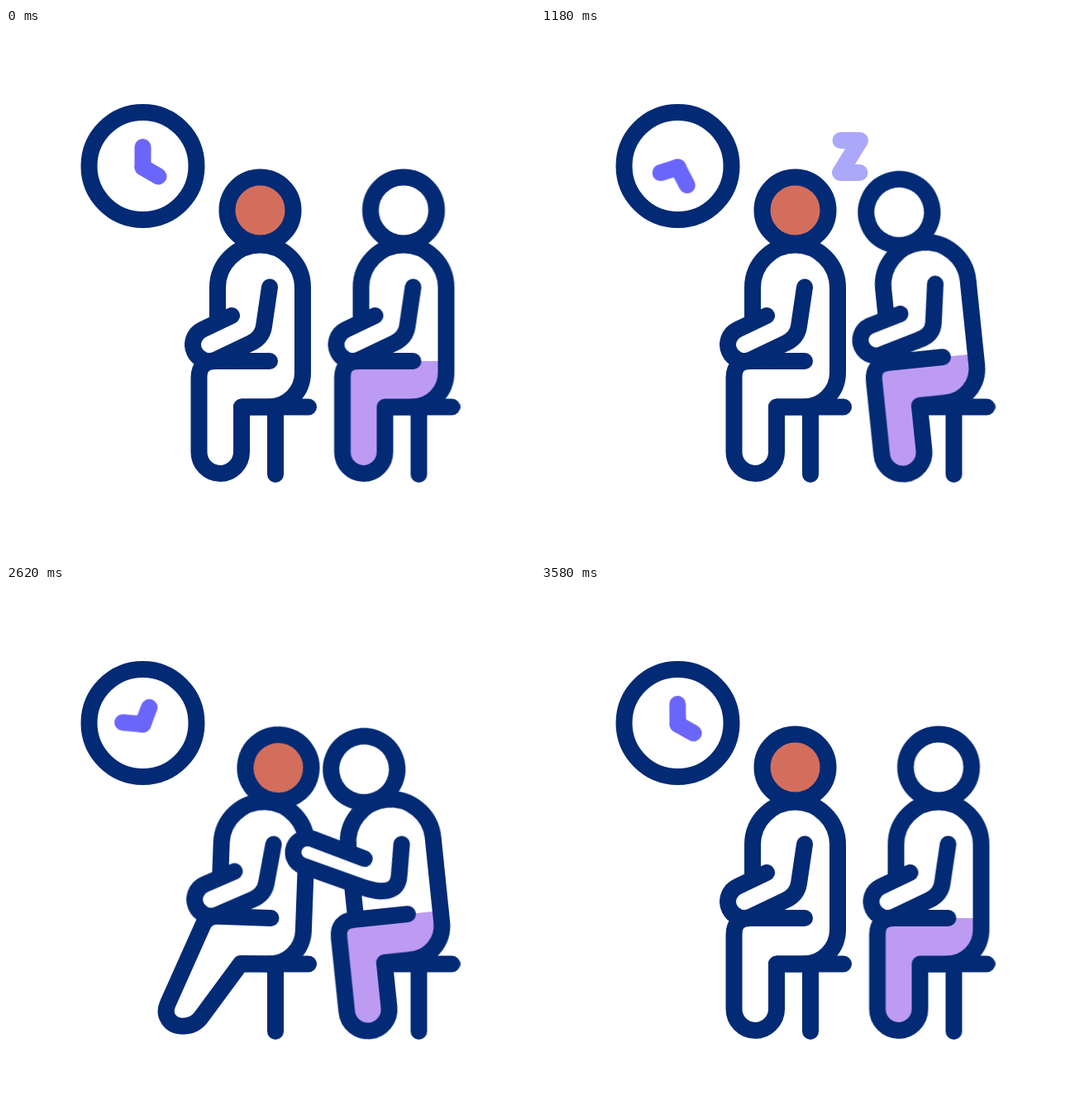
These frames come from a looping animation (640x640 px, 3600 ms). An HTML page:

```html
<!DOCTYPE html>
<html lang="en">
<head>
<meta charset="utf-8">
<title>Waiting room</title>
<style>
  html, body { margin: 0; width: 100%; height: 100%; overflow: hidden; background: #fff; }
  svg { display: block; width: 100vw; height: 100vh; }

  .line { fill: none; stroke: #032a75; stroke-width: 20; stroke-linecap: round; stroke-linejoin: round; }
  .violet { stroke: #6b66fa; }
  .arm { fill: #fff; }

  .anim { animation: 3600ms cubic-bezier(.333, 0, .667, 1) infinite; }

  /* clock */
  .hand { transform-origin: 165.5px 168.5px; }
  .minute { animation-name: minute; }
  .hour { animation-name: hour; }
  @keyframes minute {
    50% { transform: rotate(210deg); animation-timing-function: cubic-bezier(.33, .11, .67, .87); }
    100% { transform: rotate(360deg); }
  }
  @keyframes hour {
    50% { transform: rotate(182deg); animation-timing-function: cubic-bezier(.33, .13, .67, .87); }
    100% { transform: rotate(360deg); }
  }

  /* snores */
  .big { animation-name: big; }
  .small { animation-name: small; }
  @keyframes big {
    0%, 8.33%, 22.5%, 36.67%, 50.83%, 100% { opacity: 0; }
    15.42%, 43.75% { opacity: 1; }
  }
  @keyframes small {
    0%, 22.5%, 36.67%, 100% { opacity: 0; }
    29.58% { opacity: 1; }
  }

  .head { transform-origin: 307.5px 314px; }

  /* sleeper */
  .sleeper { transform-origin: 268.5px 458px; animation-name: doze; }
  .sleeper .head { animation-name: nod; }
  .sleeper .arm { animation-name: reach; }
  @keyframes doze {
    0%, 11.11%, 99.2%, 100% { transform: translate(0px, 0px) rotate(0deg); }
    33.33%, 76.67% { transform: translate(-.6px, 0px) rotate(-5.9deg); }
  }
  @keyframes nod {
    0%, 11.11%, 99.2%, 100% { transform: rotate(0deg); }
    33.33%, 76.67% { transform: rotate(-14.2deg); }
  }
  @keyframes reach {
    0%, 27.78%, 99.2%, 100% {
      d: path("M273 348 L237.4 365 A5 5 0 0 0 254.6 401 L296 381.3 C305.3 376.8 310.7 370.1 312 361 L319 313.5");
    }
    50% {
      d: path("M273.8 330.9 L213.9 300.8 A5 5 0 0 0 198.4 331.8 L270.1 366 C293.2 376.2 309.9 374.9 313.4 356.2 L320.4 318.2");
    }
    76.67% {
      d: path("M273.8 330.9 L213.9 300.8 A5 5 0 0 0 198.4 331.8 L270.1 366 C293.2 376.2 309.9 374.9 313.4 356.2 L320.4 318.2");
      animation-timing-function: ease-in;
    }
    82.2% {
      d: path("M269.9 330.6 L208.5 302.6 A5 5 0 0 0 194.2 333.6 L262.9 365.1 C288.8 374.1 304.4 372.5 309.5 360.3 L325.1 320.6");
    }
  }

  /* neighbour */
  .neighbour { transform-origin: 300px 458px; animation-name: lean; }
  .neighbour .head { animation-name: tilt; }
  .kick { animation-name: kick; }
  @keyframes lean {
    0%, 46.1%, 99.2%, 100% { transform: translate(0px, 0px) rotate(0deg); }
    68.3%, 81.9% { transform: translate(-.6px, -.6px) rotate(2.1deg); }
  }
  @keyframes tilt {
    0%, 46.1%, 99.2%, 100% { transform: translate(0px, 0px) rotate(0deg); }
    68.3% { transform: translate(.4px, -.2px) rotate(8.3deg); }
    81.9% { transform: translate(.4px, -2px) rotate(8.3deg); }
  }
  @keyframes kick {
    0%, 46.1%, 99.2%, 100% {
      d: path("M318 458.5 L285 458.5 L285 513 C285 527.2 273.2 539 259 539 C244.8 539 233.5 527.2 233.5 513 L233.5 423 Q233.5 403 253.5 403 L319 403");
    }
    68.3%, 81.9% {
      d: path("M318 458.5 L284 458 L236 523 C230 531 222 533.7 214 533.7 C199 533.7 189 521 196 506 L238 412 Q242.5 400.5 256 400.7 L320.5 403");
    }
  }
</style>
</head>
<body>
<svg viewBox="0 0 640 640">
  <defs>
    <path id="torso" d="M256 394 V314 A51.5 51.5 0 0 1 359 314 V417 A41 41.5 0 0 1 318 458.5"/>
    <path id="leg" d="M318 458.5 L285 458.5 L285 513 C285 527.2 273.2 539 259 539 C244.8 539 233.5 527.2 233.5 513 L233.5 423 Q233.5 403 253.5 403 L319 403"/>
    <path id="chair" d="M285 458.5 H366 M326 458.5 V540"/>
  </defs>

  <circle class="line" cx="165.5" cy="167" r="65"/>
  <path class="line violet anim hand minute" d="M165.5 168.5 V144"/>
  <path class="line violet anim hand hour" d="M165.5 168.5 L184.5 179.5"/>

  <use href="#chair" class="line"/>
  <path class="line anim kick" d="M318 458.5 L285 458.5 L285 513 C285 527.2 273.2 539 259 539 C244.8 539 233.5 527.2 233.5 513 L233.5 423 Q233.5 403 253.5 403 L319 403"/>
  <g class="anim neighbour">
    <circle class="line anim head" cx="307.5" cy="220.5" r="40" style="fill:#d36e5d"/>
    <use href="#torso" class="line"/>
    <path class="line arm" d="M273 348 L237.4 365 A5 5 0 0 0 254.6 401 L296 381.3 C305.3 376.8 310.7 370.1 312 361 L319 313.5"/>
  </g>

  <g transform="translate(173.5 0)">
    <use href="#chair" class="line"/>
    <g class="anim sleeper">
      <path fill="#bd9bf2" d="M253.5 403 H359 V417 A41 41.5 0 0 1 318 458.5 H285 V513 A25.75 26 0 0 1 233.5 513 V423 Q233.5 403 253.5 403Z"/>
      <circle class="line anim head" cx="307.5" cy="220.5" r="40"/>
      <use href="#torso" class="line"/>
      <use href="#leg" class="line"/>
      <path class="line arm anim" d="M273 348 L237.4 365 A5 5 0 0 0 254.6 401 L296 381.3 C305.3 376.8 310.7 370.1 312 361 L319 313.5"/>
    </g>
  </g>

  <path class="line violet anim big" d="M420 83 H452 L418.5 135 H453"/>
  <path class="line violet anim small" d="M362.5 136 H386 L362 175 H385.5"/>
</svg>
</body>
</html>
```
